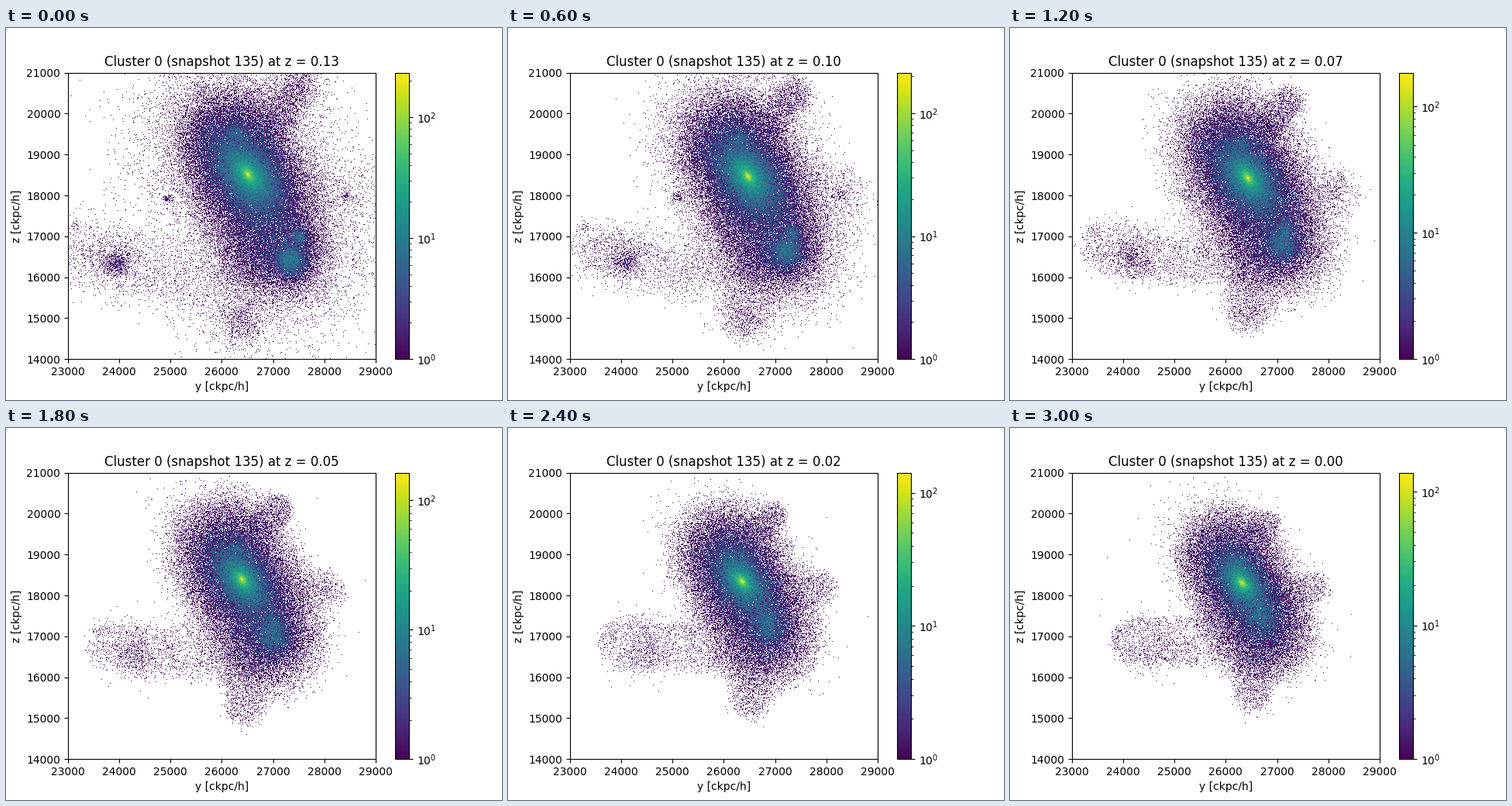
A matplotlib script for the animation above (3600 ms loop, 640x480 px).

```python
import numpy as np
import matplotlib.pyplot as plt
from matplotlib.animation import FuncAnimation
from matplotlib.colors import LogNorm

plt.rcParams["text.kerning_factor"] = 6

REDSHIFTS = [0.13, 0.10, 0.07, 0.05, 0.02, 0.00]
PEAKS = [233, 214, 186, 164, 141.5, 138.5]
STEPS = len(REDSHIFTS)
COLS, ROWS = 397, 370

# Bin centres in stage pixels; all shapes below use the same units.
px, py = np.meshgrid(80 + (np.arange(COLS) + 0.5) * 396.8 / COLS,
                     57.6 + (np.arange(ROWS) + 0.5) * 369.6 / ROWS)


def mix(start, end, t):
    return np.add(start, np.subtract(end, start) * t)


def fade(start, end, t):
    return start ** (1 - t) * end ** t


def blob(x, y, size, density):
    """Round clump with a soft edge."""
    return density * np.exp(-((px - x) ** 2 + (py - y) ** 2) / (2 * size ** 2))


def streak(x0, y0, x1, y1, width, density, power):
    """Thick line; a higher power gives it a crisper rim."""
    dx, dy = x1 - x0, y1 - y0
    along = ((px - x0) * dx + (py - y0) * dy) / (dx ** 2 + dy ** 2)
    along = np.clip(along, 0, 1)
    dist = np.hypot(px - x0 - along * dx, py - y0 - along * dy)
    return density * np.exp(-(dist / width) ** power)


def core(x, y, peak, reach):
    """Cuspy tilted ellipse."""
    tilt = np.radians(54)
    dx, dy = px - x, py - y
    along = dx * np.cos(tilt) + dy * np.sin(tilt)
    across = dx * np.sin(tilt) - dy * np.cos(tilt)
    r = np.hypot(along, across / 0.62)
    return peak / (1 + (r / 2.5) ** 1.3) * np.exp(-(r / reach) ** 2)


def density(t, peak):
    rim = mix(2, 8, t)

    def moving_blob(start, end):
        x, y, size = mix(start[:3], end[:3], t)
        return blob(x, y, size, fade(start[3], end[3], t))

    def moving_streak(start, end, power=rim):
        return streak(*mix(start, end, t), power)

    parts = [
        core(*mix((312, 189.5, peak, 78), (299.5, 200.5, peak, 68), t)),
        # main body and its outskirts
        moving_streak((293, 150, 337, 270, 56, 1.4),
                      (283, 168, 322, 260, 45, 0.9), power=3),
        moving_streak((293, 145, 345, 280, 88, 0.24),
                      (283, 168, 325, 262, 67, 0.3)),
        # top, right, left and bottom arms
        moving_streak((345, 120, 378, 75, 20, 0.6),
                      (322, 130, 332, 124, 18, 0.3)),
        moving_streak((360, 200, 440, 215, 34, 0.07),
                      (350, 222, 391, 206, 20, 0.25)),
        moving_streak((100, 290, 225, 322, 32, 0.12),
                      (162, 275, 250, 275, 31, 0.15)),
        moving_streak((310, 320, 303, 378, 32, 0.13),
                      (312, 300, 313, 343, 23, 0.2)),
        # infalling groups
        moving_blob((368, 300, 11, 7), (327, 247, 13, 2.5)),
        moving_blob((367, 296, 25, 1.1), (335, 268, 25, 0.4)),
        moving_blob((379, 270, 5, 6), (322, 241, 7, 1)),
        moving_blob((299, 134, 6, 3), (300, 170, 8, 0.8)),
        moving_blob((143, 305, 7, 1.5), (186, 290, 16, 0.1)),
        moving_blob((145, 300, 22, 0.15), (180, 275, 22, 0.03)),
        moving_blob((209, 221, 3, 1.8), (258, 205, 8, 0.1)),
        moving_blob((438, 218, 3, 1.2), (392, 206, 10, 0.05)),
        moving_blob((90, 257, 4, 0.3), (139, 268, 6, 0.1)),
        moving_blob((303, 383, 13, 0.3), (313, 346, 12, 0.1)),
    ]
    return sum(parts)


def counts(step):
    rng = np.random.default_rng(135 + step)
    hits = rng.poisson(density(step / (STEPS - 1), PEAKS[step]))
    return np.ma.masked_equal(hits, 0)


fig, ax = plt.subplots(figsize=(6.4, 4.8), dpi=100)
norm = LogNorm(1, PEAKS[0])
mesh = ax.pcolormesh(np.linspace(23000, 29000, COLS + 1),
                     np.linspace(21000, 14000, ROWS + 1),
                     counts(0), norm=norm, cmap="viridis")
ax.set_xlim(23000, 29000)
ax.set_ylim(14000, 21000)
ax.set_xlabel("y [ckpc/h]")
ax.set_ylabel("z [ckpc/h]")
title = ax.set_title("")
fig.colorbar(mesh, ax=ax)


def update(step):
    mesh.set_array(counts(step))
    norm.vmax = PEAKS[step]
    title.set_text(f"Cluster 0 (snapshot 135) at z = {REDSHIFTS[step]:.2f}")
    return mesh, title


anim = FuncAnimation(fig, update, frames=STEPS, interval=600,
                     repeat=True, repeat_delay=0, blit=False)
plt.show()
```
